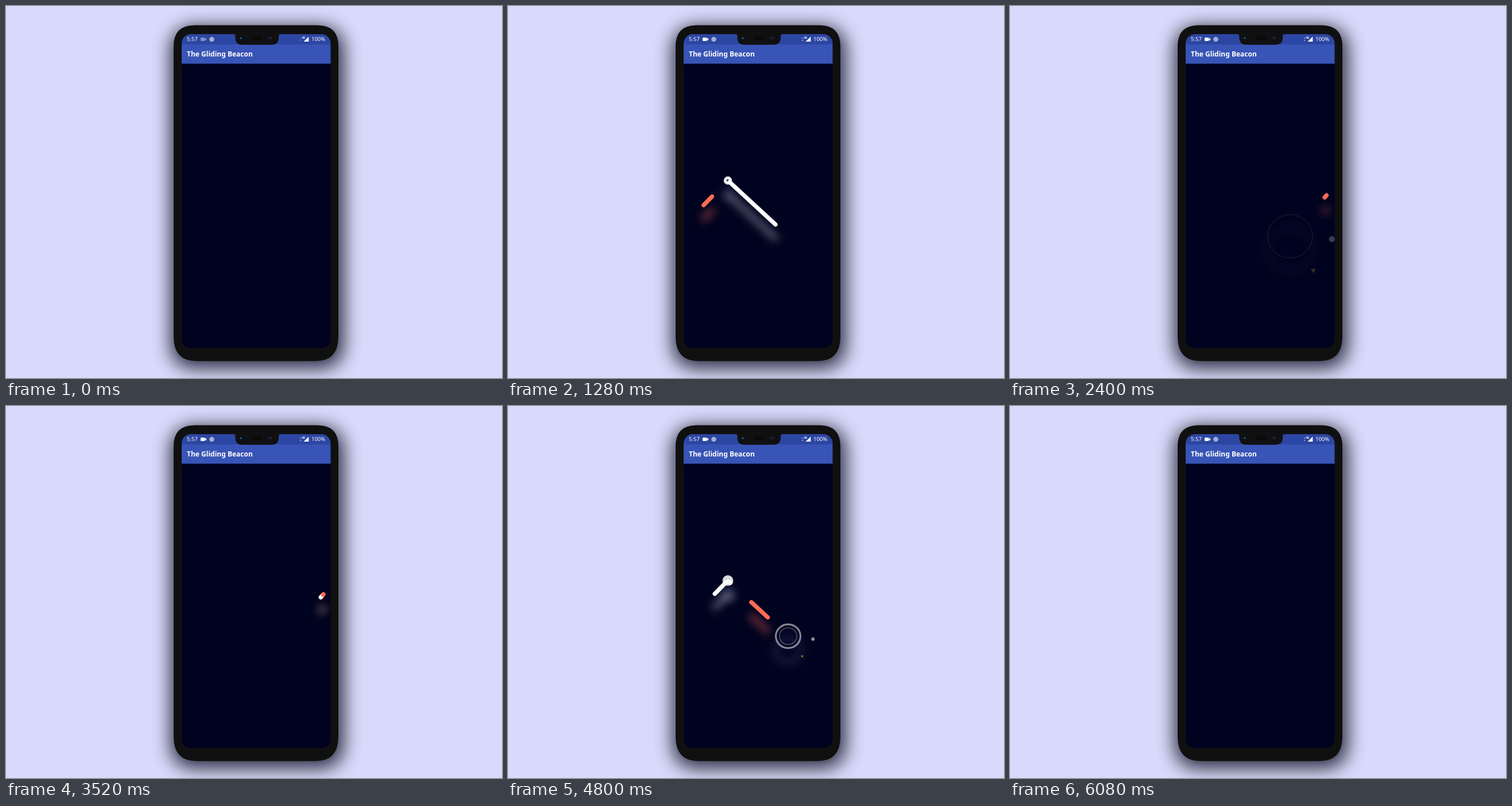
Recreate the animation shown at these times as an HTML page with a canvas. Size 864 by 648 pixels, loop 6120 ms.

```html
<!DOCTYPE html>
<html lang="en">
<head>
<meta charset="utf-8">
<title>Loader</title>
<style>
  html, body { margin: 0; width: 100%; height: 100%; overflow: hidden; background: #d8dafc; }
  svg, canvas { position: absolute; left: 0; top: 0; width: 864px; height: 648px; }
  text { fill: #fff; font-family: "Noto Sans", "Open Sans", sans-serif; }
</style>
</head>
<body>
<svg viewBox="0 0 864 648">
  <defs>
    <filter id="soft" x="-30%" y="-30%" width="160%" height="160%"><feGaussianBlur stdDeviation="16"/></filter>
    <clipPath id="screen"><rect x="306" y="49" width="259.5" height="547" rx="16"/></clipPath>
  </defs>
  <rect x="287" y="36" width="301" height="595" rx="38" fill="#05050c" opacity=".8" filter="url(#soft)"/>
  <path fill="#101010" d="M328 33.500H543Q579 34 579 70V576Q579 618.500 539 618.500H332Q292 618.500 292 576V70Q292 34 328 33.500Z"/>
  <g clip-path="url(#screen)">
    <rect x="306" y="49" width="260" height="547" fill="#00031f"/>
    <rect x="306" y="49" width="260" height="18" fill="#2c46a3"/>
    <rect x="306" y="67" width="260" height="33.500" fill="#3854b6"/>
    <path fill="#101010" d="M396 48.500Q399.500 49 399.500 53V56Q400 67.500 412 67.500H462Q474.500 67.500 475 56V53Q475 49 478.500 48.500Z"/>
  </g>
  <rect x="428" y="51.500" width="18" height="8" rx="4" fill="#0a0a0b"/>
  <circle cx="409" cy="56" r="3" fill="#0b1420"/><circle cx="409" cy="56" r="1.6" fill="#1f6794"/>
  <circle cx="460" cy="56" r="3.6" fill="#10131f"/>
  <path stroke="#273052" d="M458.500 54v4M461.500 54v4"/>
  <text x="315" y="61.300" font-size="9.5" font-weight="500">5:57</text>
  <text x="532" y="61.300" font-size="9.5" font-weight="500">100%</text>
  <text x="315" y="88.300" font-size="12" font-weight="700">The Gliding Beacon</text>
  <g id="camera" fill="#fff">
    <rect x="339" y="55" width="7.500" height="6" rx="1"/><path d="M346 58L349 55.500V60.500Z"/>
  </g>
  <circle cx="358.500" cy="58" r="4.3" fill="#a3add4"/>
  <g id="traffic" fill="#fff"><circle cx="513" cy="56" r=".8"/><circle cx="513" cy="60" r=".8"/></g>
  <text x="515.500" y="57" font-size="4.500" font-weight="700">4G</text>
  <path fill="#fff" d="M518.500 62H527.300V53.500Z"/>
</svg>
<canvas id="stage" width="864" height="648"></canvas>
<script>
const LOOP = 6120, GLOW_DROP = 24, WHITE = '#fff', RED = '#ff6a55', GOLD = '#f5b32a', BLUE = '#3f6be8';
const ctx = document.getElementById('stage').getContext('2d');
const camera = document.getElementById('camera'), traffic = document.getElementById('traffic');
const track = [[314, 374], [383, 304], [488, 401], [553, 328]];
const [, B, C] = track;

// Distances of each line's tail and head along the track at the listed times.
const passes = [
  { track, times: [300, 370, 1280, 1840, 2120, 2600],
    lines: [
      { color: WHITE, tail: [0, 3, 102, 319, 339, 339], head: [0, 7, 211, 327, 339, 339] },
      { color: RED, tail: [0, 0, 38, 150, 302, 339], head: [0, 1, 59, 267, 326, 339] }
    ] },
  { track: [...track].reverse(), times: [3450, 3520, 4400, 5120, 5380, 5800],
    lines: [
      { color: WHITE, tail: [0, 3, 101, 324, 339, 339], head: [0, 7, 169, 330, 339, 339] },
      { color: RED, tail: [0, 0, 35, 259, 316, 339], head: [0, 1, 56, 294, 328, 339] }
    ] }
];

// Sparks start near the centre and travel by move over the life of a burst.
const sparksB = [
  { color: WHITE, from: [13, 9], move: [-80, -43], round: true },
  { color: GOLD, from: [-3, 13], move: [58, -80] },
  { color: BLUE, from: [0, 1], move: [13, 82] }
];
const sparksC = [
  { color: WHITE, from: [5, 5], move: [79, 0], round: true },
  { color: GOLD, from: [4, 3], move: [42.5, 66] }
];
const bursts = [
  { at: B, start: 1130, sparks: sparksB }, { at: C, start: 1415, sparks: sparksC },
  { at: C, start: 4245, sparks: sparksC }, { at: B, start: 4595, sparks: sparksB }
];
const BURST_LIFE = 1150, BURST_RADIUS = 46;

// Smooth monotone curve through keys, at rest at both ends.
function curve(times, values, t) {
  const last = times.length - 1;
  if (t <= times[0]) return values[0];
  if (t >= times[last]) return values[last];
  const rate = i => (values[i + 1] - values[i]) / (times[i + 1] - times[i]);
  const slope = i => {
    if (i === 0 || i === last) return 0;
    const a = rate(i - 1), b = rate(i);
    return a * b > 0 ? 2 * a * b / (a + b) : 0;
  };
  const i = times.findIndex(k => k > t) - 1;
  const span = times[i + 1] - times[i], u = (t - times[i]) / span, v = 1 - u;
  return values[i] * (1 + 2 * u) * v * v + slope(i) * span * u * v * v
       + values[i + 1] * u * u * (3 - 2 * u) - slope(i + 1) * span * u * u * v;
}

// The part of a polyline between two distances along it.
function trim(points, from, to) {
  const path = new Path2D();
  let start = 0, open = false;
  for (let i = 0; i + 1 < points.length; i++) {
    const [x, y] = points[i], [nx, ny] = points[i + 1];
    const size = Math.hypot(nx - x, ny - y);
    const a = Math.max(from - start, 0) / size, b = Math.min(to - start, size) / size;
    if (a < b) {
      if (!open) path.moveTo(x + (nx - x) * a, y + (ny - y) * a);
      open = true;
      path.lineTo(x + (nx - x) * b, y + (ny - y) * b);
    }
    start += size;
  }
  return path;
}

function ring([x, y], radius) {
  const path = new Path2D(), r = Math.max(0, radius);
  path.ellipse(x, y, r, r * 0.96, 0, 0, 2 * Math.PI);
  return path;
}

function stroke(path, color, width, alpha) {
  ctx.globalAlpha = alpha;
  ctx.strokeStyle = color;
  ctx.lineWidth = width;
  ctx.stroke(path);
  ctx.globalAlpha = 1;
}

function glow(path, color, alpha) {
  ctx.save();
  ctx.filter = 'blur(8px)';
  ctx.translate(0, GLOW_DROP);
  stroke(path, color, 8, alpha);
  ctx.restore();
}

function drawSpark({ color, from, move, round }, [x, y], p) {
  const cx = x + from[0] + move[0] * p, cy = y + from[1] + move[1] * p, r = 6 * p;
  ctx.globalAlpha = 1 - 0.9 * p;
  ctx.fillStyle = color;
  ctx.beginPath();
  if (round) ctx.arc(cx, cy, r, 0, 2 * Math.PI);
  else for (let i = 0; i < 3; i++) {
    const a = 2 * Math.PI * (p + i / 3) + 0.3;
    ctx.lineTo(cx + r * Math.cos(a), cy + r * Math.sin(a));
  }
  ctx.fill();
  ctx.globalAlpha = 1;
}

function drawBurst({ at, start, sparks }, t) {
  const p = (t - start) / BURST_LIFE;
  if (p <= 0 || p >= 1) return;
  const r = BURST_RADIUS * p, width = 6 * (1 - p);
  glow(ring(at, r), '#b4c0ff', 0.3 * (1 - p));
  stroke(ring(at, r - width / 4), WHITE, width, 1 - p);
  stroke(ring(at, r * 0.68), WHITE, width * 0.4, Math.max(0, 1 - 1.35 * p));
  sparks.forEach(s => drawSpark(s, at, p));
}

function drawLine({ track, times }, { color, tail, head }, t) {
  if (t <= times[0] || t >= times[times.length - 1]) return;
  const from = curve(times, tail, t), to = curve(times, head, t);
  if (to - from < 0.05) return;
  const path = trim(track, from, to);
  glow(path, color, color === RED ? 0.6 : 0.48);
  stroke(path, color, 7.4, 1);
}

function frame(now) {
  const t = now % LOOP;
  ctx.clearRect(0, 0, 864, 648);
  ctx.save();
  ctx.beginPath();
  ctx.rect(306, 100.5, 259.5, 495);
  ctx.clip();
  ctx.lineCap = ctx.lineJoin = 'round';
  bursts.forEach(b => drawBurst(b, t));
  passes.forEach(p => p.lines.forEach(l => drawLine(p, l, t)));
  ctx.restore();
  camera.style.opacity = traffic.style.opacity = Math.min(1, 0.4 + t / 500);
  requestAnimationFrame(frame);
}
requestAnimationFrame(frame);
</script>
</body>
</html>
```
